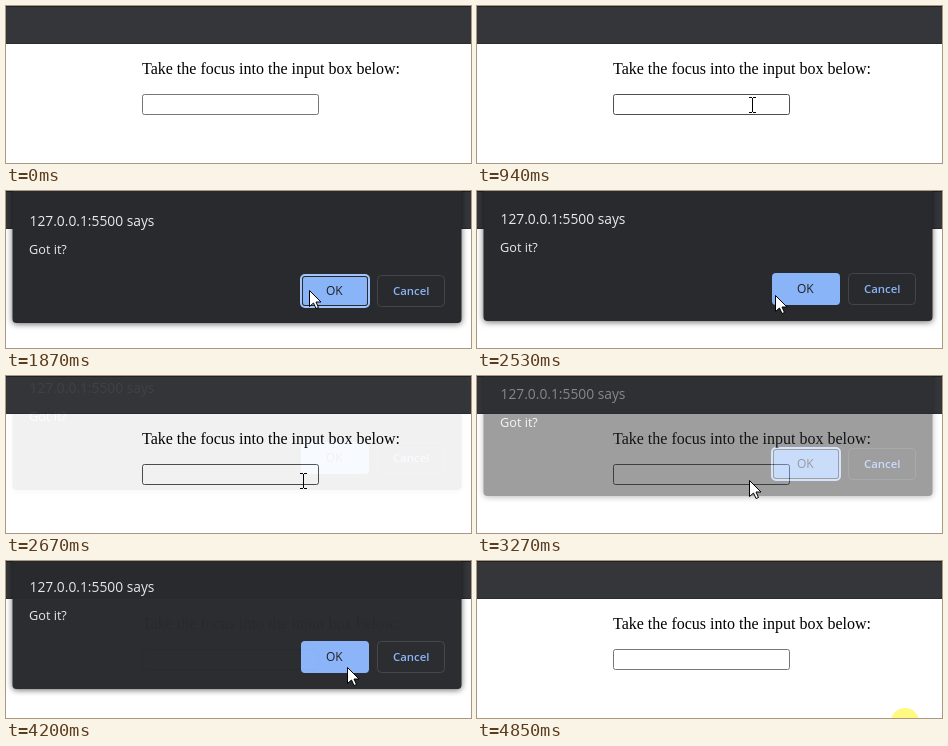
Write an HTML page with a canvas that moves like this. It is 465x157 px and loops after 4.98 s.

```html
<!DOCTYPE html>
<html lang="en">
<head>
<meta charset="utf-8">
<title>Focus alert</title>
<style>
  html, body { margin: 0; width: 100%; height: 100%; overflow: hidden; background: #fff; }
  canvas { display: block; }
</style>
</head>
<body>
<canvas id="stage" width="465" height="157"></canvas>
<script>
const W = 465, H = 157, LOOP = 4980, STEP = 66.5;
const ctx = document.getElementById('stage').getContext('2d');
const layer = document.createElement('canvas');
layer.width = W;
layer.height = H;
const dlg = layer.getContext('2d');

const SANS = '"Open Sans", "Noto Sans", sans-serif';
const BLUE = '#8ab4f8', PANEL = '#292a2d';

// Pointer path: step, x, y
const path = [
  [7, 400, 150], [10, 330, 122], [12, 290, 102], [14, 275, 98], [15, 272, 96],
  [18, 272, 96], [19, 270, 95], [22, 270, 95], [25, 277, 96], [28, 303, 99],
  [31, 300, 102], [35, 300, 103], [40, 297, 104], [43, 297, 104], [47, 272, 104],
  [52, 273, 104], [59, 341, 106], [63, 341, 106], [64, 344, 108], [67, 404, 143],
  [69, 411, 153], [70, 412, 158]
];

// Each dialog: opening start, button press, closing start
const dialogs = [
  { open: 18.83, press: 35, close: 37.07 },
  { open: 48.4, press: 60, close: 61.62 }
];
const FADE = 3;

const clamp = v => Math.min(1, Math.max(0, v));

function pointerAt(n) {
  if (n < path[0][0] || n >= 70) return null;
  const i = path.findIndex(k => k[0] > n);
  const a = path[i - 1], b = path[i];
  const u = (n - a[0]) / (b[0] - a[0]);
  return { x: Math.round(a[1] + (b[1] - a[1]) * u), y: Math.round(a[2] + (b[2] - a[2]) * u) };
}

function presence(d, n) {
  const opening = clamp((n - d.open) / FADE);
  const closing = clamp((n - d.close) / FADE);
  return Math.min(1 - (1 - opening) ** 2, 1 - closing ** 2);
}

function text(c, str, x, y, font, color) {
  c.font = font;
  c.fillStyle = color;
  c.fillText(str, x, y);
}

function box(c, x, y, w, h, r, color) {
  c.fillStyle = color;
  c.beginPath();
  c.roundRect(x, y, w, h, r);
  c.fill();
}

function frame(c, x, y, w, h, r, color) {
  c.strokeStyle = color;
  c.lineWidth = 1;
  c.beginPath();
  c.roundRect(x + .5, y + .5, w - 1, h - 1, r);
  c.stroke();
}

function drawPage(hover) {
  ctx.fillStyle = '#fff';
  ctx.fillRect(0, 0, W, H);
  ctx.fillStyle = '#35363a';
  ctx.fillRect(0, 0, W, 38);
  ctx.fillStyle = '#202124';
  ctx.fillRect(0, 0, W, 1);
  ctx.fillStyle = '#2b2c2f';
  ctx.fillRect(0, 37, W, 1);
  text(ctx, 'Take the focus into the input box below:', 136, 68,
    '16px "Liberation Serif", serif', '#000');
  frame(ctx, 136, 88, 177, 21, 2, hover ? '#4f4f4f' : '#767676');
}

function drawDialog(p, focused) {
  dlg.clearRect(0, 0, W, H);
  dlg.save();
  dlg.translate(0, Math.round(-19 * (1 - p)));
  dlg.shadowColor = 'rgba(0,0,0,.6)';
  dlg.shadowBlur = 6;
  dlg.shadowOffsetY = 1;
  box(dlg, 6.5, -20, 449, 152, 4, PANEL);
  dlg.shadowColor = 'transparent';
  text(dlg, '127.0.0.1:5500 says', 23.5, 35, '13.8px ' + SANS, '#e8eaed');
  text(dlg, 'Got it?', 23, 63, '12.7px ' + SANS, '#e8eaed');
  if (focused) {
    box(dlg, 294, 83, 70, 34, 5, '#a3c5fa');
    box(dlg, 296, 85, 66, 30, 3, PANEL);
    box(dlg, 297, 86, 64, 28, 2, BLUE);
  } else {
    box(dlg, 295, 84, 68, 32, 4, BLUE);
  }
  text(dlg, 'OK', 320, 104, '12px ' + SANS, '#202124');
  frame(dlg, 371, 84, 68, 32, 4, '#43454a');
  text(dlg, 'Cancel', 387, 104, '600 11.4px ' + SANS, BLUE);
  dlg.restore();

  ctx.globalAlpha = Math.min(1, p / .8);
  ctx.drawImage(layer, 0, 0);
  ctx.globalAlpha = 1;
}

function drawArrow(x, y) {
  ctx.save();
  ctx.translate(x + .5, y + .5);
  ctx.beginPath();
  [[0, 0], [0, 16], [4, 12.5], [6.5, 18], [9, 17], [6.5, 11.5], [11.5, 11.5]]
    .forEach(([px, py]) => ctx.lineTo(px, py));
  ctx.closePath();
  ctx.fillStyle = '#fff';
  ctx.fill();
  ctx.strokeStyle = '#000';
  ctx.lineWidth = 1;
  ctx.stroke();
  ctx.restore();
}

function drawBeam(x, y) {
  ctx.fillStyle = '#000';
  ctx.fillRect(x, y - 6, 1, 14);
  for (const dy of [-7, 8]) {
    ctx.fillRect(x - 3, y + dy, 3, 1);
    ctx.fillRect(x + 1, y + dy, 3, 1);
  }
}

function render(time) {
  const n = Math.min(74, Math.floor((time + 16) / STEP));
  const pointer = pointerAt(n);
  const active = dialogs.find(d => presence(d, n) > 0);
  const over = pointer && pointer.x >= 136 && pointer.x < 313 && pointer.y >= 88 && pointer.y < 109;

  drawPage(n >= 12 && n < 65);
  if (active) drawDialog(presence(active, n), n < active.press);
  if (n >= 73) {
    ctx.fillStyle = '#fff97f';
    ctx.beginPath();
    ctx.arc(428, 161, 14, 0, Math.PI * 2);
    ctx.fill();
  }
  if (pointer) {
    const modal = active && n < active.close + 1;
    (over && !modal ? drawBeam : drawArrow)(pointer.x, pointer.y);
  }
}

const start = performance.now();
function tick() {
  render((performance.now() - start) % LOOP);
  requestAnimationFrame(tick);
}
tick();
</script>
</body>
</html>
```
